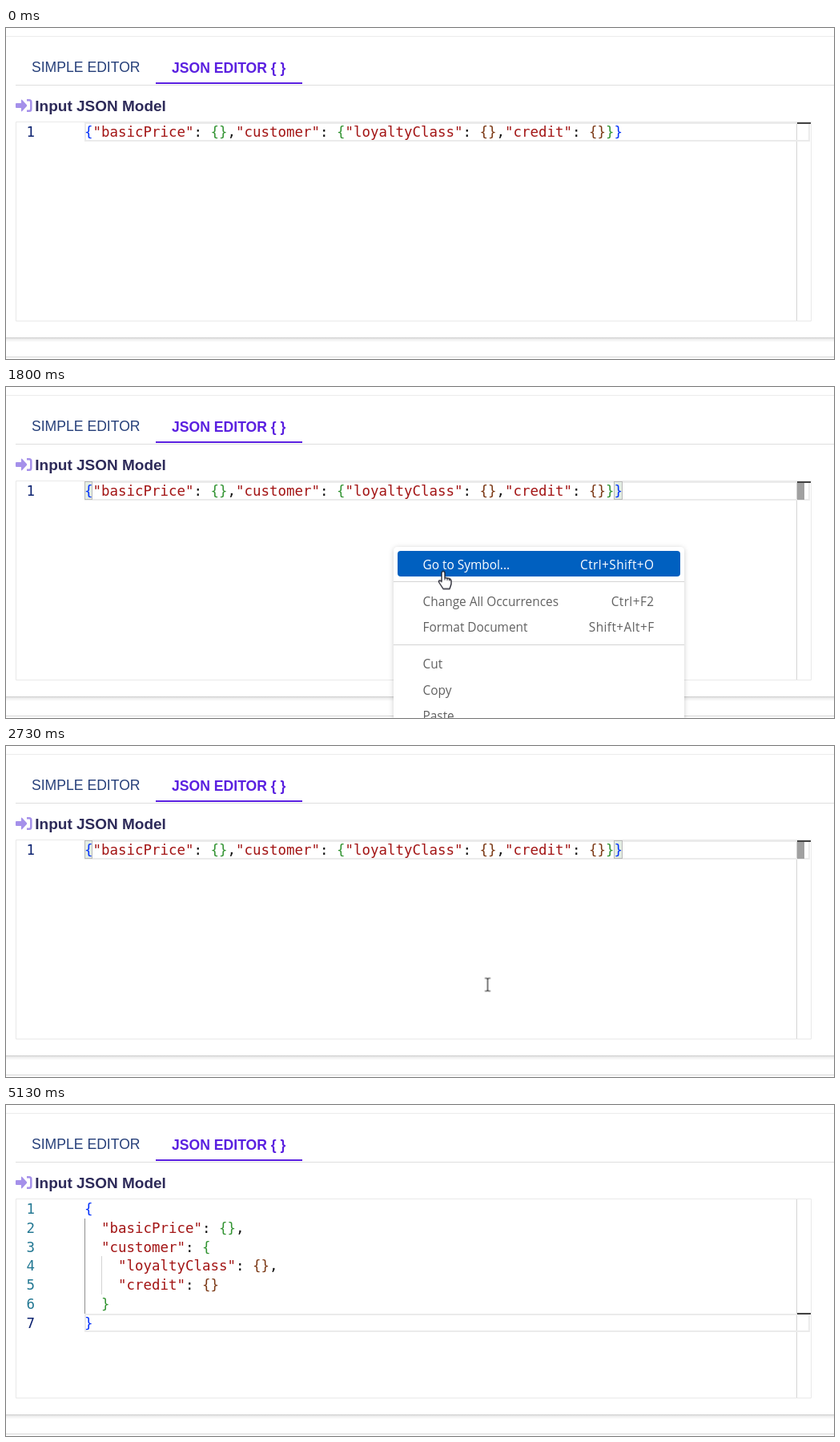
Animation of 1034 by 414 pixels, one loop 5.34 s. Source, as an HTML page:

```html
<!DOCTYPE html>
<html lang="en">
<head>
<meta charset="utf-8">
<title>JSON editor: format document</title>
<style>
html, body { margin: 0; width: 100%; height: 100%; overflow: hidden; background: #fff; }
svg { display: block; width: 100vw; height: 100vh; }
text { white-space: pre; }

.ui { font-family: "Liberation Sans", Arial, sans-serif; }
.code { font: 17.44px "DejaVu Sans Mono", monospace; fill: #111; }
.menu text { font: 15.4px "Open Sans", "Noto Sans", sans-serif; }
.menu .keys { text-anchor: end; letter-spacing: .42px; }

.str { fill: #a31515; }
.b1 { fill: #0431fa; }
.b2 { fill: #319331; }
.b3 { fill: #7b3814; }
.num { fill: #237893; }
.now { fill: #0b216f; }
.line { fill: none; stroke: #ebebeb; stroke-width: 2; }
.match { fill: #e4eee4; stroke: #b9b9b9; }
.mark { fill: #a0a0a0; }
.tick { fill: #424242; }

/* One loop is 5340 ms; every change is a hard step. */
.anim { animation: 5340ms step-end infinite; visibility: hidden; }
.raw { animation-name: raw; }
.raw-match { animation-name: raw-match; }
.menu { animation-name: menu; }
.hot1 { animation-name: hot1; }
.hot2 { animation-name: hot2; }
.hot3 { animation-name: hot3; }
.pretty { animation-name: pretty; }
.pretty-match { animation-name: pretty-match; }
.caret { animation-name: caret; }
.beam { animation-name: beam; }
.hand { animation-name: hand; }

@keyframes raw { 0% { visibility: visible } 52.43%, to { visibility: hidden } }
@keyframes raw-match { 24.9% { visibility: visible } 52.43%, to { visibility: hidden } }
@keyframes menu { 23.78% { visibility: visible } 51.12%, to { visibility: hidden } }
@keyframes hot1 { 31.27% { visibility: visible } 36.14%, to { visibility: hidden } }
@keyframes hot2 { 36.14% { visibility: visible } 38.76%, to { visibility: hidden } }
@keyframes hot3 { 38.76% { visibility: visible } 51.12%, to { visibility: hidden } }
@keyframes pretty { 52.43%, to { visibility: visible } }
@keyframes pretty-match { 52.43% { visibility: visible } 96.06%, to { visibility: hidden } }
@keyframes caret {
  52.43%, 71.16%, 89.88% { visibility: visible }
  61.23%, 81.08%, 96.06%, to { visibility: hidden }
}
@keyframes beam {
  2.43% { visibility: visible; transform: translate(856.5px, 372.5px) }
  3.74% { visibility: visible; transform: translate(786.5px, 342.5px) }
  5.05% { visibility: visible; transform: translate(684.5px, 298.5px) }
  6.17% { visibility: visible; transform: translate(586.5px, 254.5px) }
  7.49% { visibility: visible; transform: translate(514.5px, 223.5px) }
  8.8% { visibility: visible; transform: translate(488.5px, 212.5px) }
  12.54% { visibility: visible; transform: translate(487.5px, 208.5px) }
  13.67% { visibility: visible; transform: translate(486.5px, 201.5px) }
  14.98% { visibility: visible; transform: translate(486.5px, 198.5px) }
  31.27% { visibility: hidden; transform: translate(486.5px, 198.5px) }
  51.12% { visibility: visible; transform: translate(601.5px, 298.5px) }
  74.9% { visibility: visible; transform: translate(602.5px, 301.5px) }
  76.21% { visibility: visible; transform: translate(608.5px, 312.5px) }
  77.34% { visibility: visible; transform: translate(621.5px, 334.5px) }
  78.65% { visibility: visible; transform: translate(645.5px, 367.5px) }
  79.96% { visibility: visible; transform: translate(674.5px, 403.5px) }
  81.08%, to { visibility: hidden; transform: translate(674.5px, 403.5px) }
}
@keyframes hand {
  31.27% { visibility: visible; transform: translate(500px, 206px) }
  32.39% { visibility: visible; transform: translate(522px, 218px) }
  33.7% { visibility: visible; transform: translate(546px, 230.5px) }
  35.01% { visibility: visible; transform: translate(563px, 239px) }
  36.14% { visibility: visible; transform: translate(582px, 262px) }
  37.45% { visibility: visible; transform: translate(596.5px, 279.5px) }
  38.76% { visibility: visible; transform: translate(598px, 290px) }
  39.88% { visibility: visible; transform: translate(599.5px, 296.5px) }
  42.5% { visibility: visible; transform: translate(600.5px, 298.5px) }
  51.12%, to { visibility: hidden; transform: translate(600.5px, 298.5px) }
}
</style>
</head>
<body>
<svg viewBox="0 0 1034 414">
  <defs>
    <linearGradient id="fade" x2="0" y2="1">
      <stop stop-color="#c6c6c6"/>
      <stop offset=".3" stop-color="#ececec"/>
      <stop offset="1" stop-color="#fff"/>
    </linearGradient>
    <filter id="shadow" x="-10%" y="-10%" width="120%" height="120%">
      <feDropShadow dx="0" dy="1" stdDeviation="3" flood-opacity=".2"/>
    </filter>
  </defs>

  <!-- page -->
  <path d="M0 10.500H1034" stroke="#ececec"/>
  <path d="M12 71.500H1034" stroke="#dedede"/>
  <rect y="387" width="1034" height="6" fill="url(#fade)"/>
  <path d="M0 411.500H1034" stroke="#d6d6d6"/>

  <g class="ui">
    <text x="32" y="55" font-size="17.6" fill="#27407a">SIMPLE EDITOR</text>
    <text x="207" y="56" font-size="17.6" font-weight="700" fill="#5a20e0">JSON EDITOR { }</text>
    <text x="36.300" y="104" font-size="19" font-weight="700" fill="#2d2a59">Input JSON Model</text>
  </g>
  <rect x="187" y="68" width="183" height="2" fill="#5a20e0"/>
  <g fill="#a590ea">
    <path d="M13 94h6v-3.500q0-1.500 1.200-.6l5.600 6.100q.8 1 0 2l-5.600 6.100q-1.200.9-1.200-.6V100h-6q-1 0-1-1v-4q0-1 1-1z"/>
    <path d="M26 90.200h3q2.300 0 2.300 2.300v9q0 2.300-2.300 2.300h-3" fill="none" stroke="#a590ea" stroke-width="2.500"/>
  </g>

  <!-- editor -->
  <path d="M12.500 117.500H1005.500V366.500H12.500z" fill="none" stroke="#e9e9e9"/>
  <path d="M987.500 118V366" stroke="#d4d4d4"/>

  <g class="anim raw">
    <rect class="line" x="99" y="119" width="904" height="22"/>
    <rect class="tick" x="988" y="118" width="17" height="2"/>
  </g>
  <g class="anim raw-match">
    <rect class="match" x="98.500" y="118.500" width="9" height="22"/>
    <rect class="match" x="759.500" y="118.500" width="10" height="22"/>
    <rect class="mark" x="988" y="120" width="9" height="21"/>
  </g>
  <g class="anim raw code">
    <text class="now" x="25.500" y="136">1</text>
    <text x="98" y="136"><tspan class="b1">{</tspan><tspan class="str">"basicPrice"</tspan>: <tspan class="b2">{}</tspan>,<tspan class="str">"customer"</tspan>: <tspan class="b2">{</tspan><tspan class="str">"loyaltyClass"</tspan>: <tspan class="b3">{}</tspan>,<tspan class="str">"credit"</tspan>: <tspan class="b3">{}</tspan><tspan class="b2">}</tspan><tspan class="b1">}</tspan></text>
  </g>

  <g class="anim pretty">
    <rect class="line" x="99" y="262" width="904" height="21"/>
    <path d="M98.500 142V261" stroke="#8f8f8f"/>
    <path d="M119.500 189V237" stroke="#d3d3d3"/>
    <rect class="tick" x="988" y="260" width="17" height="2"/>
  </g>
  <g class="anim pretty-match">
    <rect class="match" x="98.500" y="118.500" width="9" height="22"/>
    <rect class="match" x="98.500" y="261.500" width="9" height="22"/>
    <rect class="mark" x="988" y="118" width="9" height="23"/>
    <rect class="mark" x="988" y="262" width="9" height="22"/>
  </g>
  <g class="anim pretty code">
    <g class="num">
      <text x="25.500" y="136">1</text>
      <text x="25.500" y="159.750">2</text>
      <text x="25.500" y="183.500">3</text>
      <text x="25.500" y="207.250">4</text>
      <text x="25.500" y="231">5</text>
      <text x="25.500" y="254.750">6</text>
      <text class="now" x="25.500" y="278.500">7</text>
    </g>
    <text class="b1" x="98" y="136">{</text>
    <text x="119" y="159.750"><tspan class="str">"basicPrice"</tspan>: <tspan class="b2">{}</tspan>,</text>
    <text x="119" y="183.500"><tspan class="str">"customer"</tspan>: <tspan class="b2">{</tspan></text>
    <text x="140" y="207.250"><tspan class="str">"loyaltyClass"</tspan>: <tspan class="b3">{}</tspan>,</text>
    <text x="140" y="231"><tspan class="str">"credit"</tspan>: <tspan class="b3">{}</tspan></text>
    <text class="b2" x="119" y="254.750">}</text>
    <text class="b1" x="98" y="278.500">}</text>
  </g>
  <rect class="anim caret" x="108" y="261" width="2" height="23"/>

  <!-- context menu -->
  <g class="anim menu" fill="#616161">
    <rect x="484" y="200" width="363" height="230" rx="5" fill="#fff" filter="url(#shadow)"/>
    <path d="M484 243.500H847M484 322.500H847" stroke="#d4d4d4"/>
    <g id="symbol">
      <text x="520.500" y="228">Go to Symbol...</text>
      <text class="keys" x="809.500" y="228">Ctrl+Shift+O</text>
    </g>
    <g id="change">
      <text x="520.500" y="274">Change All Occurrences</text>
      <text class="keys" x="809.500" y="274">Ctrl+F2</text>
    </g>
    <g id="format">
      <text x="520.500" y="306">Format Document</text>
      <text class="keys" x="809.500" y="306">Shift+Alt+F</text>
    </g>
    <text x="520.500" y="352">Cut</text>
    <text x="520.500" y="385">Copy</text>
    <text x="520.500" y="417">Paste</text>
  </g>
  <g class="menu-hover" fill="#0060c0">
    <g class="anim hot1">
      <rect x="489" y="205" width="353" height="32" rx="4"/>
      <g class="menu-text" fill="#fff"><text x="520.500" y="228">Go to Symbol...</text><text class="keys" x="809.500" y="228">Ctrl+Shift+O</text></g>
    </g>
    <g class="anim hot2">
      <rect x="489" y="251" width="353" height="32" rx="4"/>
      <g class="menu-text" fill="#fff"><text x="520.500" y="274">Change All Occurrences</text><text class="keys" x="809.500" y="274">Ctrl+F2</text></g>
    </g>
    <g class="anim hot3">
      <rect x="489" y="283" width="353" height="33" rx="4"/>
      <g class="menu-text" fill="#fff"><text x="520.500" y="306">Format Document</text><text class="keys" x="809.500" y="306">Shift+Alt+F</text></g>
    </g>
  </g>
  <style>
    .menu-text text { font: 15.4px "Open Sans", "Noto Sans", sans-serif; }
    .menu-text .keys { text-anchor: end; letter-spacing: .42px; }
  </style>

  <!-- pointers -->
  <path class="anim beam" d="M-3.500-8h2.500l1 1 1-1h2.500M0-7V7M-3.500 8h2.500l1-1 1 1h2.500" fill="none" stroke="#222" stroke-width="1.200"/>
  <g class="anim hand" stroke="#1c1c28" stroke-width="1.300" stroke-linejoin="round">
    <path d="M-2 2a2 2 0 0 1 4 0v6l5 1q3 .7 3 3.500v3.500l-2 6h-8l-5.500-8.500q-.5-2 1.500-2l2 1.500z" fill="#fff"/>
    <path d="M2 8v3M5 8.800v2.700M7.700 9.500v2.500" fill="none" stroke-width="1"/>
  </g>
</svg>
</body>
</html>
```
